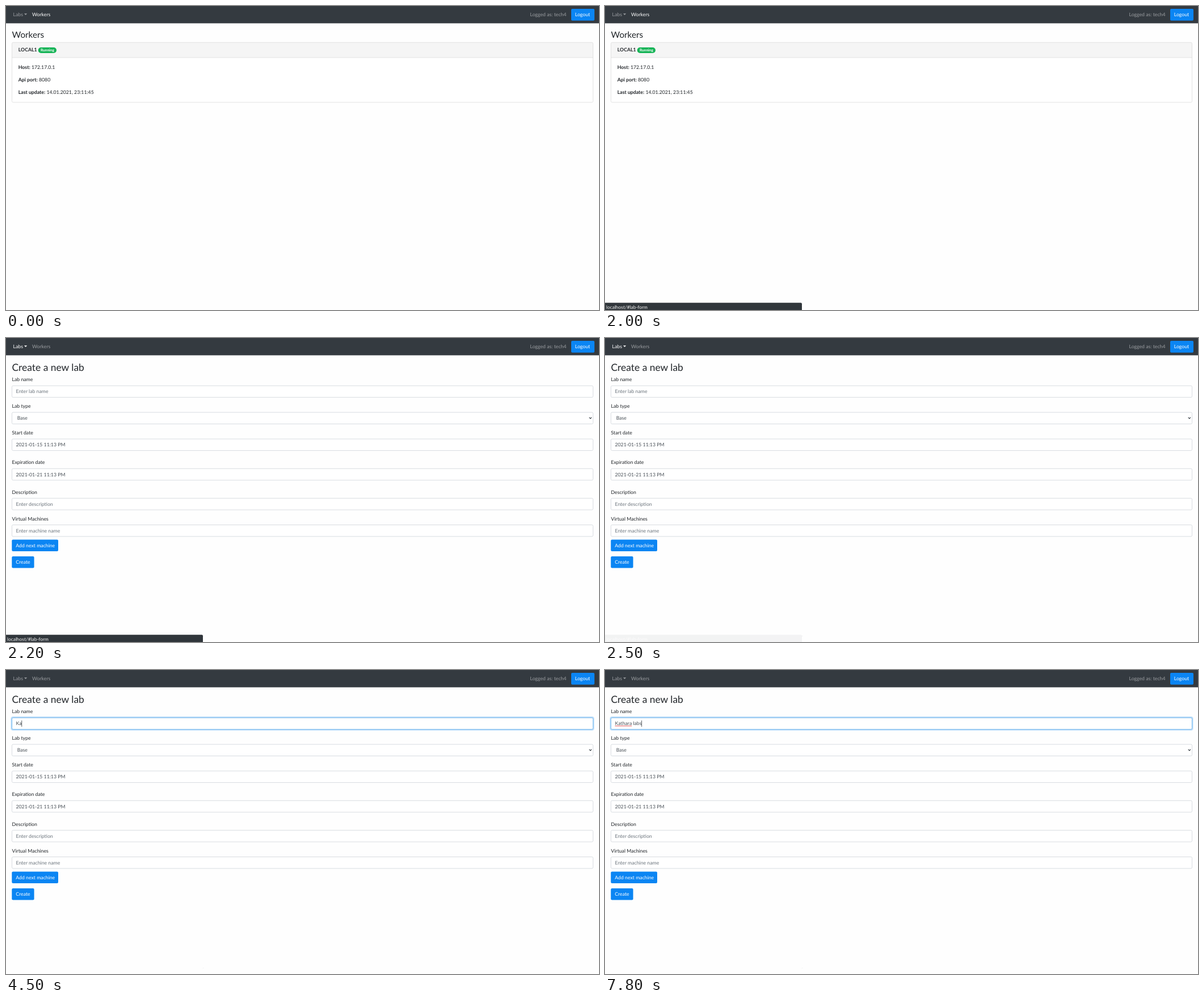
Animation, 1045 px wide and 536 px high, one loop 8000 ms. Source, as an HTML page:

```html
<!DOCTYPE html>
<html lang="en">
<head>
<meta charset="utf-8">
<title>Lab manager</title>
<style>
  html, body { margin: 0; width: 100%; height: 100%; overflow: hidden; background: #fefefe; }
  svg { display: block; width: 1045px; height: 536px; }
  text { font: 8.71px Lato, "Open Sans", sans-serif; fill: #212529; white-space: pre; text-rendering: geometricPrecision; }
  .bold { font-weight: 700; }
  .h2 { font-size: 17.42px; }
  .h3 { font-size: 15.24px; }
  .white { fill: #fff; }
  .muted { fill: #9a9da0; }
  .value { fill: #495057; }
  .hint { fill: #6c757d; }
  .badge { font-size: 6.53px; }
  .status { font-size: 8.4px; fill: #f4f4f4; }
  .button { fill: #0b85f3; }
  .field { fill: #fff; stroke: #ced4da; stroke-width: .8; }
</style>
</head>
<body>
<svg viewBox="0 0 1045 536">
  <rect width="1045" height="536" fill="#fefefe"/>
  <rect width="1045" height="30.5" fill="#343a40"/>
  <g id="labs">
    <text x="12.5" y="18" style="fill:inherit">Labs</text>
    <path d="M32 13.3h5.2l-2.6 2.6z"/>
  </g>
  <text id="workers" x="46" y="18">Workers</text>
  <text x="923.5" y="17.7" class="muted">Logged as: tech4</text>
  <rect x="996" y="5" width="41" height="20.7" rx="2" class="button"/>
  <text x="1002.8" y="18" class="white">Logout</text>

  <g id="workerPage">
    <text x="10.5" y="55.6" class="h3">Workers</text>
    <rect x="10.5" y="64.3" width="1024" height="105.5" rx="2" fill="#fff"/>
    <path d="M10.5 91V66.3q0-2 2-2h1020q2 0 2 2V91z" fill="#f5f5f5"/>
    <path d="M10.5 91h1024" stroke="#dcdcdc" stroke-width=".8"/>
    <rect x="10.5" y="64.3" width="1024" height="105.5" rx="2" fill="none" stroke="#dcdcdc" stroke-width=".8"/>
    <text x="21.8" y="80.3" class="bold">LOCAL1</text>
    <rect x="56.7" y="73" width="32.3" height="10" rx="5" fill="#17b457"/>
    <text x="72.9" y="80.3" class="bold badge white" text-anchor="middle">Running</text>
    <text x="21.8" y="111.4"><tspan class="bold">Host:</tspan> 172.17.0.1</text>
    <text x="21.8" y="133.2"><tspan class="bold">Api port:</tspan> 8080</text>
    <text x="21.8" y="155"><tspan class="bold">Last update:</tspan> 14.01.2021, 23:11:45</text>
  </g>

  <g id="formPage">
    <text x="10.5" y="58" class="h2">Create a new lab</text>
    <g id="fields"></g>
    <path d="M1027.8 139.9l2.1 2.2 2.1-2.2" fill="none" stroke="#343a40" stroke-width="1.1"/>
    <rect x="10.3" y="355.5" width="81.7" height="20.6" rx="2" class="button"/>
    <text x="17.3" y="369" class="white">Add next machine</text>
    <rect x="10.3" y="385" width="39.3" height="20.6" rx="2" class="button"/>
    <text x="17.3" y="398.4" class="white">Create</text>
    <g id="focus" fill="none">
      <rect x="9.4" y="83.1" width="1026.2" height="22.6" rx="3" stroke="#bfdffa" stroke-width="2"/>
      <rect x="10.5" y="84.2" width="1024" height="20.4" rx="2" stroke="#74b8ee" stroke-width="1"/>
    </g>
    <text id="name" x="17.5" y="97.4" class="value"></text>
    <path id="typo" stroke="#e2484f" stroke-width=".9"/>
    <rect id="caret" y="89" width=".8" height="11" fill="#343a40"/>
  </g>

  <g id="menu">
    <rect x="8.6" y="26.6" width="92.8" height="44" rx="2" fill="#fff" stroke="#ccc" stroke-width=".8"/>
    <text x="21.8" y="42.8">List all labs</text>
    <text x="21.8" y="60.4">Create a new one</text>
  </g>

  <g id="status">
    <path id="statusBar" fill="#30363b"/>
    <text id="statusText" x="2" y="533.5" class="status"></text>
  </g>
</svg>
<script>
const $ = id => document.getElementById(id);
const show = (id, on) => $(id).style.opacity = Number(on);
const between = (t, a, b) => t >= a && t < b;
// Value of the latest [time, value] step that has begun.
const stepAt = (t, steps) => steps.findLast(s => t >= s[0])[1];

// label, label baseline, field top, content, class, text x
const fields = [
  ['Lab name', 76.2, 84.2, 'Enter lab name', 'hint', 17.5],
  ['Lab type', 123.1, 131.1, 'Base', 'value', 19.7],
  ['Start date', 170, 178, '2021-01-15 11:13 PM', 'value', 17.5],
  ['Expiration date', 222.3, 230.3, '2021-01-21 11:13 PM', 'value', 17.5],
  ['Description', 274.6, 282.6, 'Enter description', 'hint', 17.5],
  ['Virtual Machines', 321.5, 329.5, 'Enter machine name', 'hint', 17.5]
];
$('fields').innerHTML = fields.map(([label, base, top, content, cls, x], i) => `
  <text x="10.5" y="${base}">${label}</text>
  <rect x="10.5" y="${top}" width="1024" height="20.4" rx="2" class="field"/>
  <text id="content${i}" x="${x}" y="${top + 13.2}" class="${cls}">${content}</text>`).join('');

const title = 'Kathara labs';
const typed = [[0, 0], [4500, 2], [4700, 3], [4800, 4], [4900, 5], [5600, 7],
  [5800, 8], [5900, 9], [6100, 10], [6400, 11], [7000, 12]];
const statusWidth = [[0, 46.4], [1600, 77.5], [2000, 347]];
const statusFade = [[0, 0], [1200, 1], [2400, .5], [2500, .05], [3200, 0]];

function draw(t) {
  const form = t >= 2200;
  show('workerPage', !form);
  show('formPage', form);
  show('menu', between(t, 1200, 2000));
  $('labs').style.fill = between(t, 900, 2000) || between(t, 2200, 3200) ? '#fff' : '#9a9da0';
  $('workers').style.fill = t < 2100 ? '#fff' : '#9a9da0';

  const w = stepAt(t, statusWidth);
  show('status', stepAt(t, statusFade));
  $('statusBar').setAttribute('d', `M0 523.3H${w - 2}q2 0 2 2V536H0z`);
  $('statusText').textContent = 'localhost/#' + (t < 1600 ? '' : 'lab-form');

  const count = stepAt(t, typed), name = $('name');
  name.textContent = title.slice(0, count);
  show('content0', !count);
  show('focus', stepAt(t, [[0, 0], [3200, .5], [3300, 1]]));
  const end = count ? name.getComputedTextLength() : 0;
  $('caret').setAttribute('x', 17.3 + end);
  show('caret', t >= 3200 && !between(t, 3800, 4500) && !between(t, 7200, 7800));
  show('typo', t >= 5800);
  if (count > 7) $('typo').setAttribute('d', `M17.5 98.7h${name.getSubStringLength(0, 7)}`);
}

function loop() {
  draw(performance.now() % 8000);
  requestAnimationFrame(loop);
}
loop();
</script>
</body>
</html>
```
